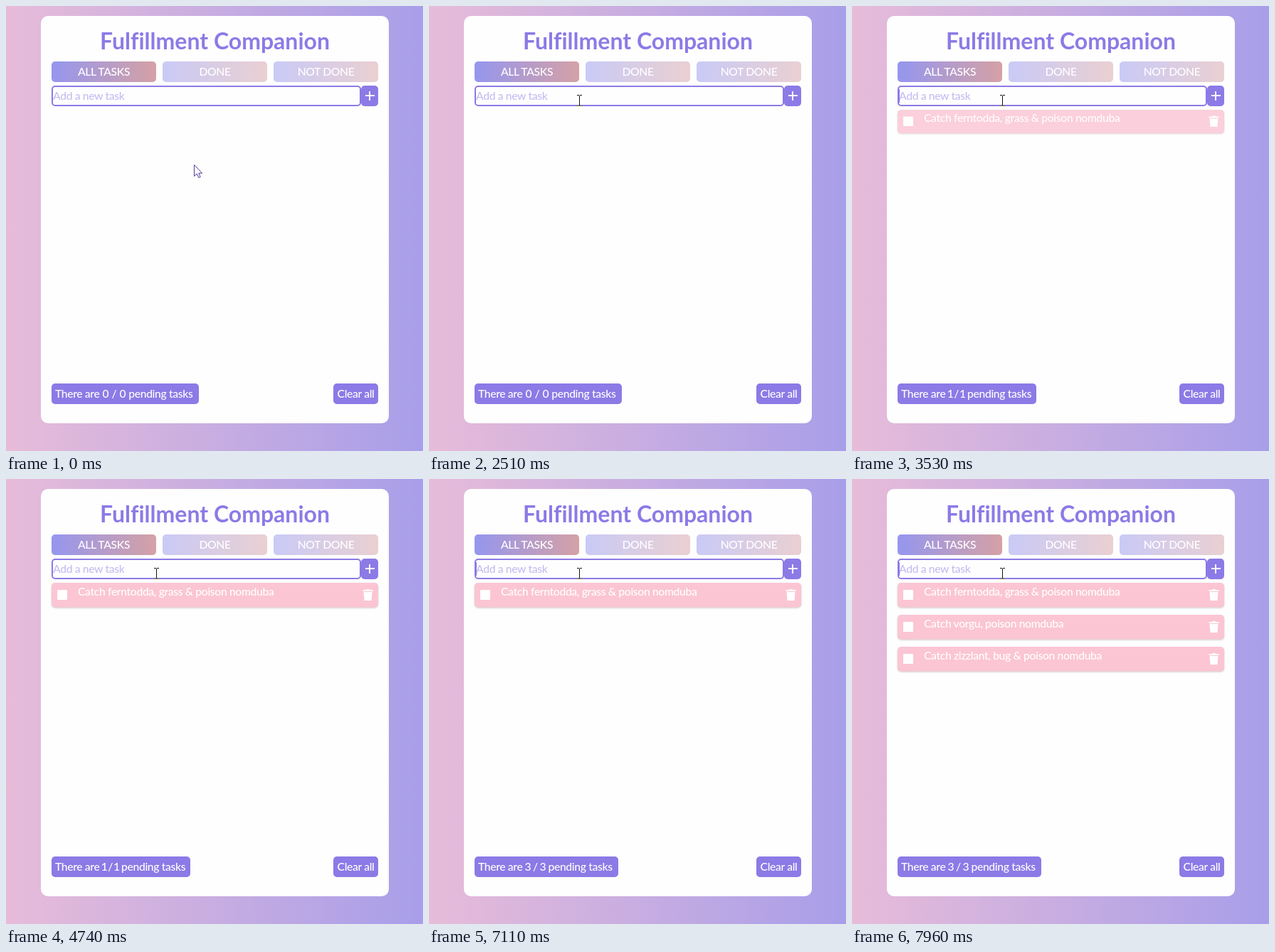
An HTML page for the animation above (8000 ms loop, 586 px wide and 626 px high).

```html
<!DOCTYPE html>
<html lang="en">
<head>
<meta charset="utf-8">
<title>Task list</title>
<style>
  html, body { margin: 0; width: 100%; height: 100%; overflow: hidden; }
  body { background: linear-gradient(to right, #e7bcd9, #a89ee9); }
  svg { display: block; width: 586px; height: 626px; }
  text { font: 500 15.7px Lato, sans-serif; letter-spacing: -.35px; fill: #fff; white-space: pre; }
  .title { font-size: 32px; font-weight: 700; letter-spacing: 0; font-variant-ligatures: none; fill: #8c7ae6; }
  .middle { text-anchor: middle; }
  .accent { fill: #8c7ae6; }
  .typed { fill: #8c7ae6; letter-spacing: -1px; }
  .hint { fill: #c5bcf2; }
  .row { filter: drop-shadow(0 1px 1px rgba(0, 0, 0, .2)); }
</style>
</head>
<body>
<svg viewBox="0 0 586 626">
  <defs>
    <linearGradient id="tabFill">
      <stop stop-color="#9596ef"/>
      <stop offset="1" stop-color="#d5a1a5"/>
    </linearGradient>
  </defs>
  <rect x="49" y="14" width="489" height="573" rx="10" fill="#fefefe"/>
  <text class="title middle" x="293.5" y="60.5">Fulfillment Companion</text>
  <g id="tabs"></g>

  <rect x="65" y="113" width="433" height="27" rx="4" fill="#fefefe" stroke="#8c7ae6" stroke-width="2"/>
  <rect class="accent" x="499" y="112" width="24" height="29" rx="5"/>
  <path d="M505 126h13M511 120v13" stroke="#fff" stroke-width="2"/>
  <text id="hint" class="hint" x="66" y="132">Add a new task</text>
  <text id="typed" class="typed" x="66" y="132"></text>
  <rect id="caret" class="accent" y="117" width="1" height="19"/>

  <g id="rows"></g>

  <rect id="statusBox" class="accent" x="64" y="531" height="29" rx="5"/>
  <text id="status" x="69" y="551"></text>
  <rect class="accent" x="460" y="531" width="63" height="29" rx="5"/>
  <text class="middle" x="491.5" y="551">Clear all</text>

  <path id="arrow" d="M.5 .5V16.5L4.3 13L6.8 18.5L9.2 17.5L6.8 12.2H11.6Z" fill="#fff" stroke="#54399a"/>
  <g id="beam">
    <path d="M-3.5 -7.5H-.5M.5 -7.5H3.5M0 -7V7" stroke="#111" fill="none"/>
    <path d="M-3.5 7.5H3.5" stroke="#85872a"/>
  </g>
</svg>
<script>
const LOOP = 8000;
const $ = id => document.getElementById(id);

const tasks = [
  { label: "Catch ferntodda, grass & poison nomduba", start: 3320 },
  { label: "Catch vorgu, poison nomduba", start: 7320 },
  { label: "Catch zizzlant, bug & poison nomduba", start: 7320 }
];

// Input contents and caret position from each time on.
const typing = [
  [0, "", 66], [2720, "1", 72], [3110, "", 66], [4940, "2", 74], [5070, "23", 83],
  [6130, "23,", 86], [6590, "23,1", 92], [6660, "23,15", 100], [7110, "", 66]
];
const caretOn = [
  [1040, 1510], [2040, 2510], [2720, 3050], [3110, 3640], [4210, 4740],
  [4940, 5270], [5800, 6330], [6590, 6860], [7110, 7390], [7920, LOOP]
];

// Task count, box width and letter spacing of the count from each time on.
const counts = [[0, 0, 207, 0], [3110, 1, 195, -1.7], [7110, 3, 202, -.8]];

const latest = (list, t) => list.findLast(entry => entry[0] <= t);
const show = (node, visible) => node.setAttribute("visibility", visible ? "visible" : "hidden");
const place = (node, x, y) => node.setAttribute("transform", `translate(${x} ${y})`);

$("tabs").innerHTML = ["ALL TASKS", "DONE", "NOT DONE"].map((label, i) => `
  <rect x="${64 + 156 * i}" y="78" width="147" height="29" rx="5" fill="url(#tabFill)" opacity="${i ? .5 : 1}"/>
  <text class="middle" x="${137.5 + 156 * i}" y="98">${label}</text>`).join("");

$("rows").innerHTML = tasks.map(task => `
  <g class="row">
    <rect width="459" height="34.5" rx="5" fill="#fbc5d4"/>
    <rect x="8" y="10" width="14" height="14" rx="1" fill="#fff"/>
    <text x="37" y="18">${task.label.replace("&", "&amp;")}</text>
    <path d="M437.5 10h4l1-1h4l1 1h4v2h-14zM438.5 13h12l-1 12h-10z" fill="#fff"/>
  </g>`).join("");
const rows = [...$("rows").children];

function drawRow(row, i, t) {
  const { start } = tasks[i];
  show(row, t >= start);
  const progress = Math.max(0, Math.min(1, (t - start + 70) / 370));
  const stretch = .4 + .6 * Math.sin(progress * Math.PI / 2);
  row.setAttribute("transform", `translate(64 ${146 + 45 * i}) scale(1 ${stretch})`);
  row.setAttribute("opacity", .27 + .73 * progress);
}

function drawPointer(t) {
  const step = t < 70 ? 0 : Math.min(6, Math.floor((t - 70) / 76) + 1);
  const travel = Math.sin(step / 6 * Math.PI / 2);
  let x = 264 - 51.5 * travel;
  let y = 223 - 90 * travel;
  if (t >= 640) x = 211.5;
  if (t >= 840 && t < 940) { x = 217; y = 136; }
  const overInput = y < 141;
  show($("arrow"), !overInput);
  show($("beam"), overInput);
  place($("arrow"), x, y);
  place($("beam"), x, y);
}

function drawInput(t) {
  const [, text, caretX] = latest(typing, t);
  $("typed").textContent = text;
  show($("hint"), !text);
  $("caret").setAttribute("x", caretX);
  show($("caret"), caretOn.some(([from, to]) => t >= from && t < to));
}

let shownCount;
function drawStatus(t) {
  const [, count, width, spacing] = latest(counts, t);
  if (count === shownCount) return;
  shownCount = count;
  $("status").innerHTML =
    `There are<tspan style="letter-spacing:${spacing}px"> ${count} / ${count}</tspan> pending tasks`;
  $("statusBox").setAttribute("width", width);
}

const origin = performance.now();
function frame() {
  const t = (performance.now() - origin) % LOOP;
  drawPointer(t);
  drawInput(t);
  drawStatus(t);
  rows.forEach((row, i) => drawRow(row, i, t));
  requestAnimationFrame(frame);
}
frame();
</script>
</body>
</html>
```
